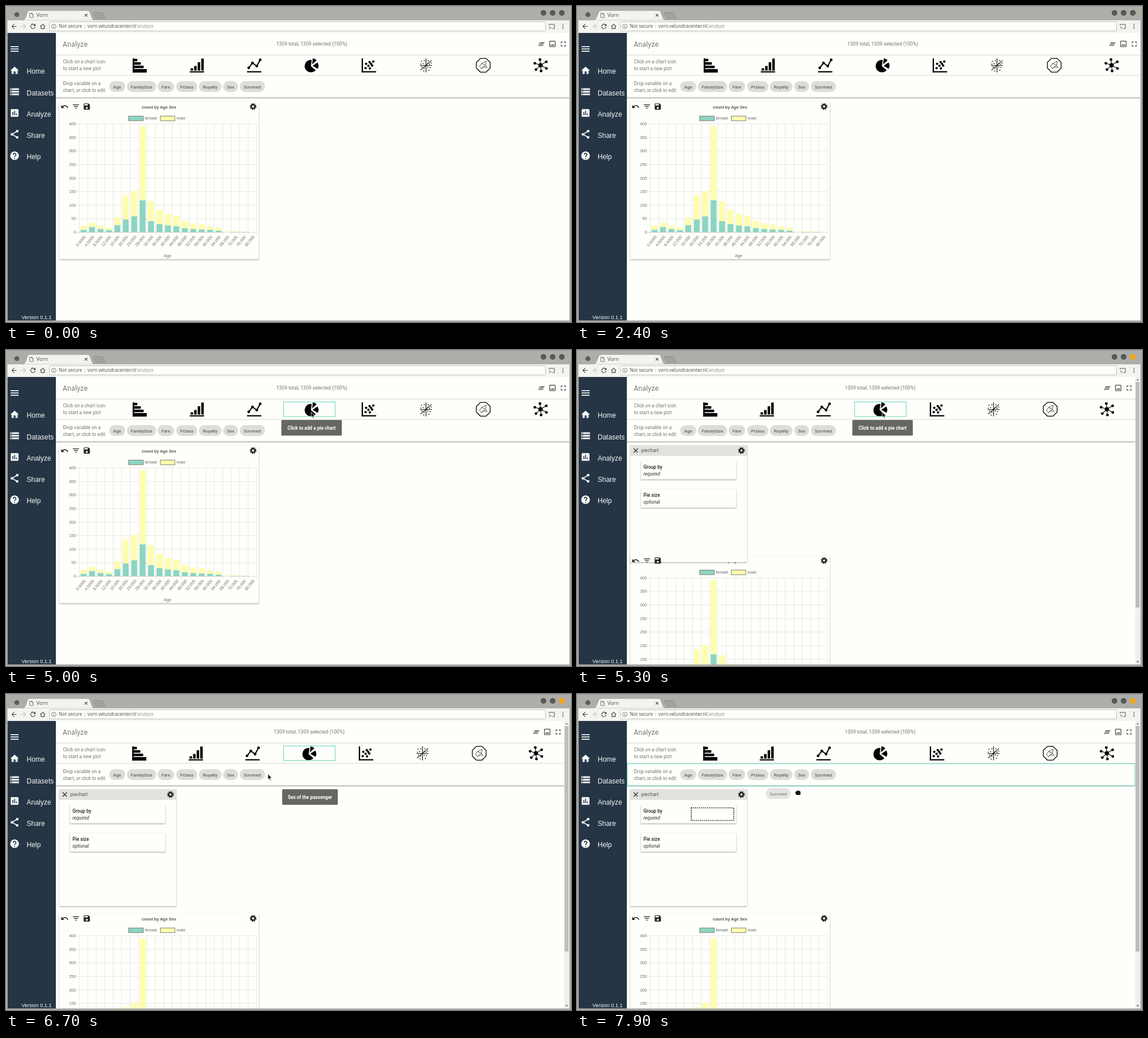
These frames come from a looping animation (986x551 px, 8 s). An HTML page:

```html
<!DOCTYPE html>
<html lang="en">
<head>
<meta charset="utf-8">
<title>Chart dashboard</title>
<style>
html, body { margin: 0; width: 100%; height: 100%; overflow: hidden; background: #fefefa; }
svg { display: block; }
text { font: 8.2px Roboto, sans-serif; fill: #757573; }
.ui { font: 8px "Noto Sans", sans-serif; fill: #555; }
.side { font: 12px "Liberation Sans", Arial, sans-serif; fill: #f4f6f4; }
.plot { font: 7.2px "Liberation Sans", Arial, sans-serif; fill: #6b6b69; }
.card { fill: #fefefb; filter: drop-shadow(0 1px 1px rgba(0,0,0,.38)); }
.tip { font-weight: 700; fill: #fff; }
</style>
</head>
<body>
<svg id="stage" width="986" height="551" viewBox="0 0 986 551"></svg>
<script>
const LOOP = 8000, STEP = 100;
const TEAL = '#8dd5c2', YELLOW = '#fdfdac';

const ICONS = {
  home: 'M10 20v-6h4v6h5v-8h3L12 3 2 12h3v8z',
  storage: 'M2 20h20v-4H2zm2-3h2v2H4zM2 4v4h20V4zm4 3H4V5h2zm-4 7h20v-4H2zm2-3h2v2H4z',
  bars: 'M19 3H5q-2 0-2 2v14q0 2 2 2h14q2 0 2-2V5q0-2-2-2zM9 17H7v-7h2zm4 0h-2V7h2zm4 0h-2v-4h2z',
  save: 'M17 3H5q-2 0-2 2v14q0 2 2 2h14q2 0 2-2V7zm-5 16a3 3 0 1 1 0-6 3 3 0 0 1 0 6zm3-10H5V5h10z',
  undo: 'M12.5 8c-2.65 0-5.05.99-6.9 2.6L2 7v9h9l-3.62-3.62c1.4-1.16 3.16-1.88 5.12-1.88 3.54 0 6.55 2.31 7.6 5.5l2.37-.78C21.08 11.03 17.15 8 12.5 8z',
  filter: 'M10 18h4v-2h-4zM3 6v2h18V6zm3 7h12v-2H6z',
  clear: 'M5 13h14v-2H5zm-2 4h14v-2H3zM7 7v2h14V7z',
  image: 'M19 5v14H5V5h14m0-2H5q-2 0-2 2v14q0 2 2 2h14q2 0 2-2V5q0-2-2-2zm-4.9 8.9l-3 3.8L9 13.1 6 17h12z',
  full: 'M7 14H5v5h5v-2H7zm-2-4h2V7h3V5H5zm12 7h-3v2h5v-5h-2zM14 5v2h3v3h2V5z',
  close: 'M19 6.4L17.6 5 12 10.6 6.4 5 5 6.4l5.6 5.6L5 17.6 6.4 19l5.6-5.6 5.6 5.6 1.4-1.4-5.6-5.6z',
  back: 'M20 11H7.8l5.6-5.6L12 4l-8 8 8 8 1.4-1.4L7.8 13H20z',
  reload: 'M17.65 6.35A8 8 0 1 0 19.73 14h-2.08A6 6 0 1 1 16.2 7.8L13 11h7V4z',
  house: 'M12 4L3 12h3v8h12v-8h3zM8 18v-8l4-3.5 4 3.5v8z'
};

// Markup helpers
const rect = (x, y, w, h, fill, extra = '') => `<rect x="${x}" y="${y}" width="${w}" height="${h}" fill="${fill}" ${extra}/>`;
const circle = (x, y, r, fill, extra = '') => `<circle cx="${x}" cy="${y}" r="${r}" fill="${fill}" ${extra}/>`;
const path = (d, fill, extra = '') => `<path d="${d}" fill="${fill}" ${extra}/>`;
const stroke = (d, color, w = 1, extra = '') => path(d, 'none', `stroke="${color}" stroke-width="${w}" ${extra}`);
const text = (x, y, s, cls = '', extra = '') => `<text x="${x}" y="${y}" class="${cls}" ${extra}>${s}</text>`;
const group = (id, body, extra = '') => `<g id="${id}" ${extra}>${body}</g>`;
const icon = (name, x, y, scale = .6, fill = '#222', extra = '') =>
  path(ICONS[name], fill, `fill-rule="evenodd" transform="translate(${x} ${y}) scale(${scale}) ${extra} translate(-12 -12)"`);
const gear = (x, y) => circle(x, y, 3.2, 'none', 'stroke="#222" stroke-width="2.5"') +
  circle(x, y, 4.9, 'none', 'stroke="#222" stroke-width="1.8" stroke-dasharray="2.1 1.75"');
const MID = 'text-anchor="middle"';

function sector(x, y, r, from, to) {
  const at = a => [x + r * Math.cos(a * Math.PI / 180), y + r * Math.sin(a * Math.PI / 180)].map(v => v.toFixed(2)).join(' ');
  return path(`M${x} ${y}L${at(from)}A${r} ${r} 0 ${to - from > 180 ? 1 : 0} 1 ${at(to)}z`, '#000');
}

function browser() {
  return rect(0, 0, 986, 25, '#aeaea9') + rect(0, 0, 986, 1, '#9c9c97') +
    circle(19, 15, 4.3, '#5c5c5a') +
    path('M30 25Q33 24 35 18L38 10Q39 8 41 8H143Q145 8 146 10L150 21Q151 24 154 25z', '#f3f3f0', 'stroke="#8f8f8b" stroke-width=".6"') +
    path('M152 11.5H168L173 21.5H158Q156 21.5 155 19z', '#a3a39f', 'stroke="#858581" stroke-width=".7"') +
    rect(0, 25, 986, 22, '#f3f3f0') +
    stroke('M41.5 12.5H45.5L47.5 14.5V20H41.5zM45 12.5V15H47.5', '#666', .9) +
    text(53, 19.2, 'Vorn', 'ui', 'style="font-size:9px"') +
    stroke('M137.5 13.8L142 18.3M142 13.8L137.5 18.3', '#444', 1.1) +
    icon('back', 14, 35.5, .56, '#444') + icon('back', 30.5, 35.5, .56, '#c4c4c1', 'rotate(180)') +
    icon('reload', 47, 35.5, .56, '#444') + icon('house', 64, 35.5, .56, '#444') +
    rect(76, 27.5, 865.5, 16, '#fdfdfa', 'rx="1.5" stroke="#b9b9b5" stroke-width=".9"') +
    circle(83.5, 35.5, 3.9, 'none', 'stroke="#666" stroke-width=".9"') +
    stroke('M83.5 33.3V34.2M83.5 35V37.8', '#666', 1) +
    text(92, 38.3, 'Not secure', 'ui') + stroke('M137.5 30.5V40.5', '#c9c9c6', .8) +
    text(142, 38.3, 'vorn.velundracenter.nl<tspan fill="#999">/analyze</tspan>', 'ui', 'fill="#333"') +
    stroke('M948 34V32H957V39.5H953.5M948 36.5Q951 36.5 951 39.5M948 38.5L949 39.5', '#555', 1) +
    [32, 35.5, 39].map(y => circle(972, y, .9, '#444')).join('') +
    circle(938, 12, 5, '#595957') + circle(954, 12, 5, '#595957') +
    circle(970, 12, 5, '#595957', 'id="quit"');
}

function sidebar() {
  const white = '#f4f6f4';
  const labels = ['Home', 'Datasets', 'Analyze', 'Share', 'Help'];
  return rect(2.5, 47, 84.5, 502, '#263545') +
    stroke('M8 70.8H22M8 74.8H22M8 78.8H22', white, 1.7) +
    icon('home', 15, 112.5, .76, white) + icon('storage', 15, 149.5, .76, white) + icon('bars', 15, 186.5, .76, white) +
    stroke('M19.3 218.5L10.5 223.7L19.3 229', white, 1.6) +
    [[19.5, 218.3], [10.3, 223.7], [19.5, 229]].map(p => circle(...p, 2.3, white)).join('') +
    circle(15, 261, 7.6, white) +
    stroke('M12.7 259.2Q12.8 256.8 15 256.8T17.3 259Q17.3 260 16.2 261T15 263.4M15 264.9V266.4', '#263545', 1.5) +
    labels.map((s, i) => text(36, 118.4 + 37.2 * i, s, 'side')).join('') +
    text(27, 545.8, 'Version 0.1.1', 'side', 'style="font-size:9px"');
}

// Plot type glyphs, drawn around (0, 0)
const dots = (list, r) => list.map(p => circle(...p, r, '#000')).join('');
const GLYPHS = [
  rect(-12, -12, 2.4, 25, '#000') + [8, 14, 19, 24.5].map((w, i) => rect(-12, -11.3 + i * 6, w, 4.4, '#000')).join('') + rect(-12, 10.8, 24.5, 2, '#000'),
  [4, 8, 14.5, 21].map((h, i) => rect(-11 + i * 6.2, 9.3 - h, 4.4, h, '#000')).join('') + rect(-12.5, 10.5, 25, 2.1, '#000'),
  stroke('M-9.5 4.5L-3 -4L4.5 1.5L10.5 -9.5', '#000', 2) + dots([[-9.5, 4.5], [-3, -4], [4.5, 1.5], [10.5, -9.5]], 2.4) + rect(-12.5, 10.3, 25, 2.2, '#000'),
  sector(-1, 1.5, 10.8, 40, 278) + sector(1.2, -1.6, 10.5, -84, -42) + sector(2, 1, 10.3, -34, 30),
  rect(-12.3, -12, 2.3, 24.5, '#000') + rect(-12.3, 10.3, 25.3, 2.2, '#000') +
    dots([[-5.5, 5], [-.5, 1], [-4.5, -2.5], [2, 5.5], [6, .5], [1.5, -5.5], [8, -6.5], [4, -2.5]], 2.1),
  stroke('M0 -12V12.5M-10.5 .5H10.5M-9.5 8.5L9.5 -8.5', '#000', 1.1) +
    dots([[-8, -7], [-5, -3], [-3, -8], [-7, 3], [-3, 5], [4, -8], [6, -2], [7, 4], [3, 3], [5, 9], [9, -4], [-4, 10], [-9, -2], [3, -3]], .9),
  stroke('M-4.9 -12H4.9L12 -5V5L4.9 12H-4.9L-12 5V-5z', '#000', 1.3) +
    stroke('M-6.5 2L-3 -3L5 -7L4 0L6.5 4L0 3L-3 6zM-3 -3L4 0L-3 6', '#000', .9, 'stroke-dasharray="1.6 .6"'),
  [[-10, -3.5], [-1, -10], [10, -6], [10.3, 5.5], [1, 10], [-8, 7.5]].map(p => stroke(`M0 0L${p}`, '#000', 1.1) + circle(...p, 2.4, '#000')).join('') + circle(0, 0, 3.7, '#000')
];

const CHIPS = [['Age', 180, 28], ['FamilySize', 211, 51], ['Fare', 264.5, 29], ['Pclass', 297, 37], ['Royalty', 336.5, 39.5], ['Sex', 379, 26], ['Survived', 408, 44]];
const chip = ([s, x, w], y = 131) => rect(x, y, w, 19, '#dcdcd9', 'rx="9.5"') +
  text(x + w / 2, y + 12.5, s, '', `${MID} style="font-size:7.9px;fill:#444"`);

function header() {
  const rule = y => stroke(`M87 ${y}H983`, '#b4b4b0', .8, 'stroke-dasharray="1.2 .6"');
  return rect(87, 47, 896, 113, '#fefefa') +
    text(99, 71, 'Analyze', '', 'style="font-size:12px;letter-spacing:.24px"') +
    text(533.7, 69, '1309 total, 1309 selected (100%)', '', `id="count" ${MID} style="font-size:8.5px"`) +
    group('tools', icon('clear', 934.3, 66.2, .6, '#444') + icon('image', 953.5, 66.2, .6, '#444') + icon('full', 972.5, 66.2, .6, '#444')) +
    rule(85.5) + rule(121) + rect(87, 159.3, 896, 1.5, '#b2b2ae') + rect(87, 160.8, 896, 1, '#e4e4e0') +
    text(99.5, 100.3, 'Click on a chart icon') + text(99.5, 112.3, 'to start a new plot') +
    text(99.5, 137.5, 'Drop variable on a') + text(99.5, 149.5, 'chart, or click to edit') +
    GLYPHS.map((g, i) => group('glyph' + i, g)).join('') +
    CHIPS.map(c => chip(c)).join('');
}

function barChart() {
  const women = [9, 19, 12, 8, 26, 47, 59, 118, 41, 30, 25, 22, 15, 12, 10, 9, 6, 0, 1, 1, 0];
  const total = [24, 35, 25, 17, 55, 136, 152, 390, 114, 83, 67, 61, 42, 33, 29, 22, 17, 2, 4, 2, 1];
  const left = 128, gap = 14.72, base = 394.5, unit = .4725;
  let s = rect(93, 167, 348, 274.5, '#fefefb', 'class="card"');
  for (let i = 0; i <= 21; i++) s += rect(left + i * gap - .3, 205.5, .7, 193, '#dfdfdb');
  for (let v = 0; v <= 400; v += 50) {
    const y = base - v * unit;
    s += rect(123, y - .3, 314, .7, v ? '#dfdfdb' : '#b8b8b4') + text(122, y + 2.5, v, 'plot', 'text-anchor="end"');
  }
  total.forEach((n, i) => {
    const x = left + (i + .5) * gap, w = 10.4, split = women[i] * unit;
    s += rect(x - w / 2, base - n * unit, w, n * unit - split, YELLOW) + rect(x - w / 2, base - split, w, split, TEAL);
    const label = (i * 4).toFixed(i < 3 ? 4 : 3);
    s += text(0, 0, label, 'plot', `text-anchor="end" transform="translate(${x + 4.3} 403) rotate(-50)"`);
  });
  const key = (x, color, name) => rect(x, 192, 25.5, 8, color, 'stroke="#70706c" stroke-width=".9"') + text(x + 28.3, 198.4, name, 'plot');
  return s + key(214, TEAL, 'female') + key(269.3, YELLOW, 'male') + text(282, 438, 'Age', 'plot', MID) +
    text(267, 178.6, 'count by Age Sex', 'plot', `${MID} style="font-weight:700;fill:#555"`);
}

function pieCard() {
  const slot = (y, name, note) => rect(111.5, y, 166.5, 32.5, '#fefefb', 'class="card"') +
    text(116, y + 13.5, name, '', 'style="font-weight:500;fill:#222"') +
    text(116, y + 25.5, note, '', 'style="font-style:italic;fill:#333"');
  return rect(93, 166, 204, 204, '#fefefb', 'class="card"') + rect(93, 166, 204, 18.7, '#e2e2df') +
    icon('close', 102.5, 175.3) + text(112, 178.3, 'piechart', '', 'style="font-size:8.4px;fill:#555"') + gear(287, 175.3) +
    slot(193, 'Group by', 'required') + slot(242.5, 'Pie size', 'optional');
}

const tip = (id, x, y, w, s) => group(id, rect(x, y, w, 27.3, '#666662', 'rx="1.5"') + text(x + w / 2, y + 16.6, s, 'tip', MID));

document.getElementById('stage').innerHTML =
  rect(0, 0, 986, 551, '#fefefa') +
  group('chart', barChart()) + group('pie', pieCard()) +
  group('chartTools', icon('undo', 102.3, 175.5) + icon('filter', 122, 175.3) + icon('save', 141, 175.3) + gear(431.2, 175.3)) +
  header() +
  rect(484.5, 90.5, 90, 25.5, 'none', 'id="pieFocus" stroke="#7fdcc6" stroke-width="1.2"') +
  rect(87.5, 121.5, 886, 38.7, 'none', 'id="rowFocus" stroke="#7fdcc6" stroke-width="1.4"') +
  rect(199.5, 198.5, 74, 22, 'none', 'id="slot" stroke="#111" stroke-width="1.7" stroke-dasharray="1.7 1.7"') +
  group('bar', rect(974, 47, 9, 502, '#f0f0ec') + rect(974.8, 56, 6.8, 393, '#bdbdb9') +
    path('M976.5 53L978.5 50.5L980.5 53z', '#666') + path('M976.5 542.5L978.5 545L980.5 542.5z', '#444')) +
  tip('pieTip', 480.5, 122, 105.5, 'Click to add a pie chart') +
  tip('sexTip', 482, 166, 97, 'Sex of the passenger') +
  browser() + sidebar() +
  rect(0, 25, 2.5, 526, '#a9a9a4') + rect(983.3, 25, 2.7, 526, '#a9a9a4') + rect(0, 548.3, 986, 2.7, '#a9a9a4') +
  group('ghost', chip(['Survived', 0, 43.5], 0), 'opacity=".75"') +
  group('arrow', path('M0 0V9.6L2.2 7.6L3.8 11L5.4 10.3L3.9 7H7z', '#111', 'stroke="#fff" stroke-width=".7"')) +
  group('hand', path('M-2 1.5Q-2 .3 0 .3V-1Q1 -2 2 -1.2Q3 -2 4 -1.2Q5.5 -1.6 5.8 -.4Q7 -.4 7 1V4.5Q7 6 5.5 6H0Q-2 4.5 -2 1.5z', '#111'));

// [ms, x, y] stops
const POINTER = [[2800, 430, 42], [3400, 508, 100], [3600, 517, 103], [3800, 532.5, 108], [5300, 532.5, 108],
  [5900, 538, 118], [6100, 520, 128], [6400, 396, 140], [6700, 457, 139.5], [7000, 436, 141], [7600, 436, 141], [7900, 383, 170]];
const GHOST = [[7600, 408, 131], [7900, 329.5, 164]];

function along(stops, t) {
  let i = stops.findIndex(s => s[0] > t);
  if (i < 0) i = stops.length;
  if (i === 0) return stops[0].slice(1);
  const a = stops[i - 1], b = stops[i] || a;
  const k = a === b ? 0 : (t - a[0]) / (b[0] - a[0]);
  return [a[1] + (b[1] - a[1]) * k, a[2] + (b[2] - a[2]) * k];
}

const el = id => document.getElementById(id);
const show = (id, on) => el(id).style.display = on ? '' : 'none';
const move = (id, x, y) => el(id).setAttribute('transform', `translate(${x} ${y})`);

// The chart slides down to make room for the new card
function drop(t) {
  const k = Math.min(1, Math.max(0, (t - 5200) / 165));
  return 216 * (1 - (1 - k) ** 2.35);
}

function draw(t) {
  const added = t >= 5100, dragging = t >= 7400, y = drop(t);
  el('quit').setAttribute('fill', added ? '#f2a71b' : '#595957');
  el('count').setAttribute('x', added ? 529.2 : 533.7);
  move('tools', added ? -9 : 0, 0);
  GLYPHS.forEach((g, i) => move('glyph' + i, added ? 232.4 + i * 98.9 : 233.2 + i * 99.95, 103.3));
  move('chart', 0, y);
  move('chartTools', 0, y);
  show('chartTools', !added || y > 100);
  show('pie', added);
  show('bar', added);
  show('pieFocus', t >= 5000 && t < 7300);
  show('rowFocus', t >= 7300);
  show('slot', dragging);
  show('pieTip', t >= 3400 && t < 5700);
  show('sexTip', t >= 6400 && t < 7300);
  show('ghost', dragging);
  show('arrow', t >= 2800 && !dragging);
  show('hand', dragging);
  const p = along(POINTER, t);
  move('arrow', ...p);
  move('hand', ...p);
  move('ghost', ...along(GHOST, t));
}

const start = performance.now();
function tick() {
  const t = (performance.now() - start) % LOOP;
  draw(Math.floor(t / STEP) * STEP);
  requestAnimationFrame(tick);
}
tick();
</script>
</body>
</html>
```
